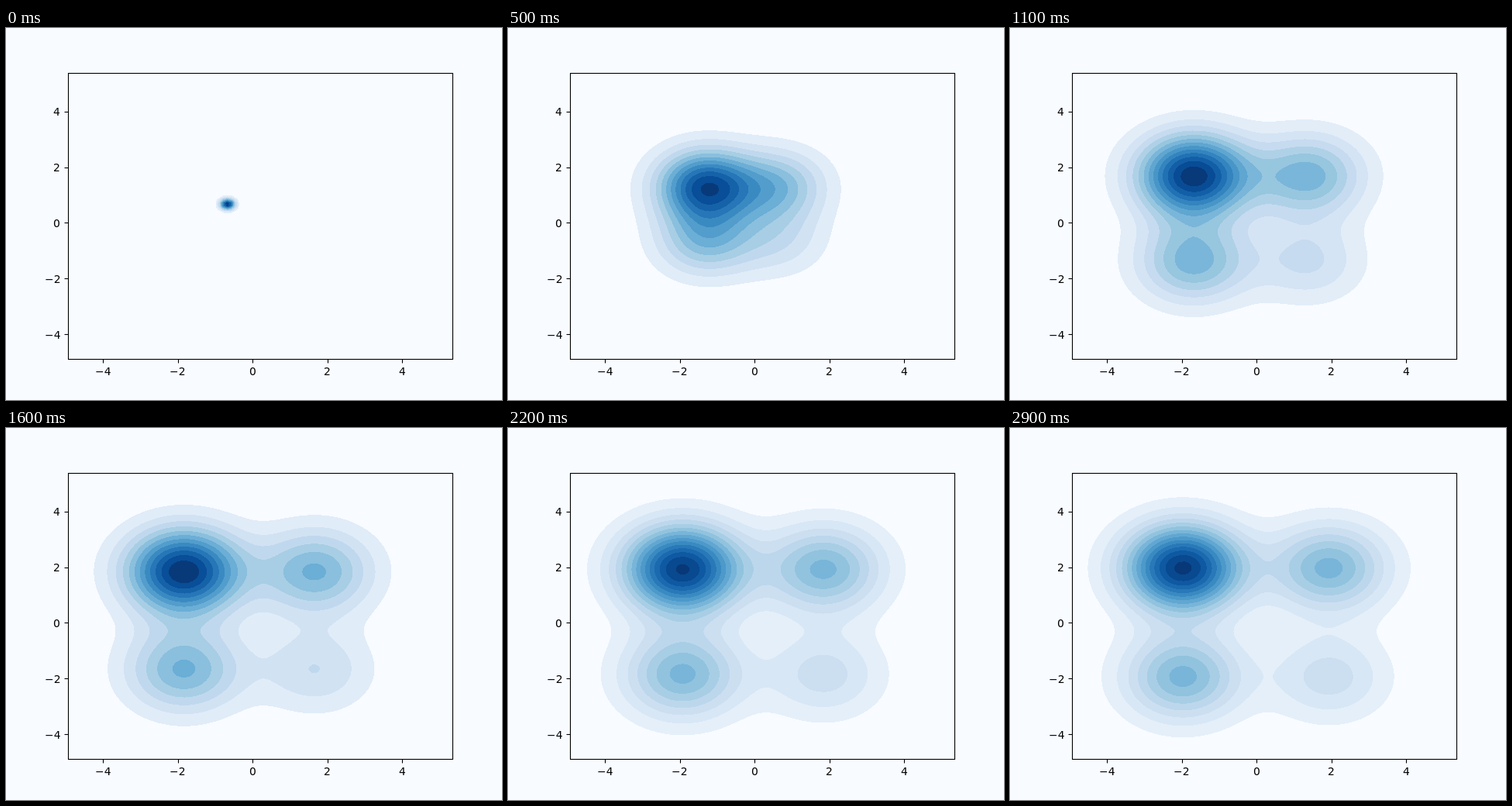
Animation of 640x480 px, one loop 3 s. Source, as an HTML page with a canvas:

```html
<!DOCTYPE html>
<html lang="en">
<head>
<meta charset="utf-8">
<title>Density plot</title>
<style>
  html, body { margin: 0; width: 100%; height: 100%; overflow: hidden; background: #f8fbff; }
  canvas { display: block; }
</style>
</head>
<body>
<canvas id="plot" width="640" height="480"></canvas>
<script>
const ctx = document.getElementById('plot').getContext('2d');

const LOOP = 3000, STEP = 100;
const BOX = { x: 80, y: 58, w: 496, h: 369 };
const ORIGIN = { x: 318.2, y: 251.4 }, UNIT = { x: 48.25, y: 35.9 };
const TICKS = [-4, -2, 0, 2, 4];
const LINE = 1.11, TICK = 5;

const TAU = 750;                 // relaxation time of the drift, ms
const START = .67, TARGET = 2;   // distance of the clusters from each axis
const SHARE = .675;              // share of the mass on the left, and on top
const POINT_VAR = .018, SPREAD_VAR = 1.15;

const NODES = 100, MAX_LAYERS = 16;
const NICE = [1, 1.5, 2, 2.5, 3, 4, 5, 6, 8, 10];
const BACK = [248, 251, 255];
const BLUES = ['f7fbff', 'deebf7', 'c6dbef', '9ecae1', '6baed6', '4292c6', '2171b5', '08519c', '08306b']
  .map(hex => [0, 2, 4].map(i => parseInt(hex.slice(i, i + 2), 16)));

const lerp = (a, b, f) => a + (b - a) * f;

// One point drifts apart into four clusters, widening with a slight pulse.
function clustersAt(t) {
  const left = Math.exp(-t / TAU);
  const pulse = .035 * (1 - left) * Math.cos(2 * Math.PI * (t - 2200) / 850);
  const v = POINT_VAR + SPREAD_VAR * (1 - left ** 1.7) + pulse;
  const clusters = [];
  for (const sx of [-1, 1])
    for (const sy of [-1, 1])
      clusters.push({
        x: lerp(sx * TARGET, -START, left),
        y: lerp(sy * TARGET, START, left),
        w: (sx < 0 ? SHARE : 1 - SHARE) * (sy > 0 ? SHARE : 1 - SHARE),
        v
      });
  return clusters;
}

function densityGrid(clusters) {
  const grid = new Float64Array(NODES * NODES);
  for (const { x, y, w, v } of clusters) {
    const bell = d => Math.exp(-d * d / (2 * v));
    const gx = [], gy = [];
    for (let i = 0; i < NODES; i++) {
      const f = i / (NODES - 1);
      gx.push(bell((BOX.x + BOX.w * f - ORIGIN.x) / UNIT.x - x));
      gy.push(bell((ORIGIN.y - BOX.y - BOX.h * f) / UNIT.y - y));
    }
    const peak = w / (2 * Math.PI * v);
    for (let j = 0; j < NODES; j++)
      for (let i = 0; i < NODES; i++) grid[j * NODES + i] += peak * gx[i] * gy[j];
  }
  return grid;
}

// Smallest round step that needs no more than MAX_LAYERS.
function levelStep(max) {
  const raw = max / MAX_LAYERS;
  const base = 10 ** Math.floor(Math.log10(raw));
  return base * NICE.find(n => n * base >= raw);
}

function blues(f) {
  const s = f * (BLUES.length - 1), i = Math.min(Math.floor(s), BLUES.length - 2);
  return BLUES[i].map((v, k) => Math.round(lerp(v, BLUES[i + 1][k], s - i)));
}

function drawContours(t) {
  const grid = densityGrid(clustersAt(t));
  const max = grid.reduce((a, b) => Math.max(a, b));
  const step = levelStep(max);
  const count = Math.ceil(max / step);
  const colors = Array.from({ length: count }, (_, k) => k ? blues((k + .5) / count) : BACK);

  ctx.fillStyle = `rgb(${BACK})`;
  ctx.fillRect(0, 0, 640, 480);

  const img = ctx.createImageData(BOX.w, BOX.h);
  let o = 0;
  for (let y = 0; y < BOX.h; y++) {
    const v = (y + .5) / BOX.h * (NODES - 1), j = Math.floor(v);
    for (let x = 0; x < BOX.w; x++) {
      const u = (x + .5) / BOX.w * (NODES - 1), i = Math.floor(u), n = j * NODES + i;
      const d = lerp(lerp(grid[n], grid[n + 1], u - i), lerp(grid[n + NODES], grid[n + NODES + 1], u - i), v - j);
      const c = colors[Math.min(count - 1, Math.floor(d / step))];
      img.data[o++] = c[0];
      img.data[o++] = c[1];
      img.data[o++] = c[2];
      img.data[o++] = 255;
    }
  }
  ctx.putImageData(img, BOX.x, BOX.y);
}

function line(x, y, dx, dy) {
  ctx.beginPath();
  ctx.moveTo(x, y);
  ctx.lineTo(x + dx, y + dy);
  ctx.stroke();
}

function drawAxes() {
  const left = BOX.x + .5, bottom = BOX.y + BOX.h + .5;
  ctx.strokeStyle = ctx.fillStyle = '#000';
  ctx.lineWidth = LINE;
  ctx.strokeRect(left, BOX.y + .5, BOX.w, BOX.h);
  ctx.font = '13.89px "DejaVu Sans", sans-serif';
  for (const n of TICKS) {
    const label = String(n).replace('-', '\u2212');
    const width = ctx.measureText(label).width;
    const x = ORIGIN.x + n * UNIT.x, y = ORIGIN.y - n * UNIT.y;
    line(Math.round(x) + .5, bottom, 0, TICK);
    line(left, Math.round(y) + .5, -TICK, 0);
    ctx.fillText(label, Math.round(x - width / 2), 448);
    ctx.fillText(label, Math.round(70.3 - width), Math.round(y + 5.5));
  }
}

let shown = -1;
function frame() {
  const t = Math.floor(performance.now() % LOOP / STEP) * STEP;
  if (t !== shown) {
    shown = t;
    drawContours(t);
    drawAxes();
  }
  requestAnimationFrame(frame);
}
frame();
</script>
</body>
</html>
```
